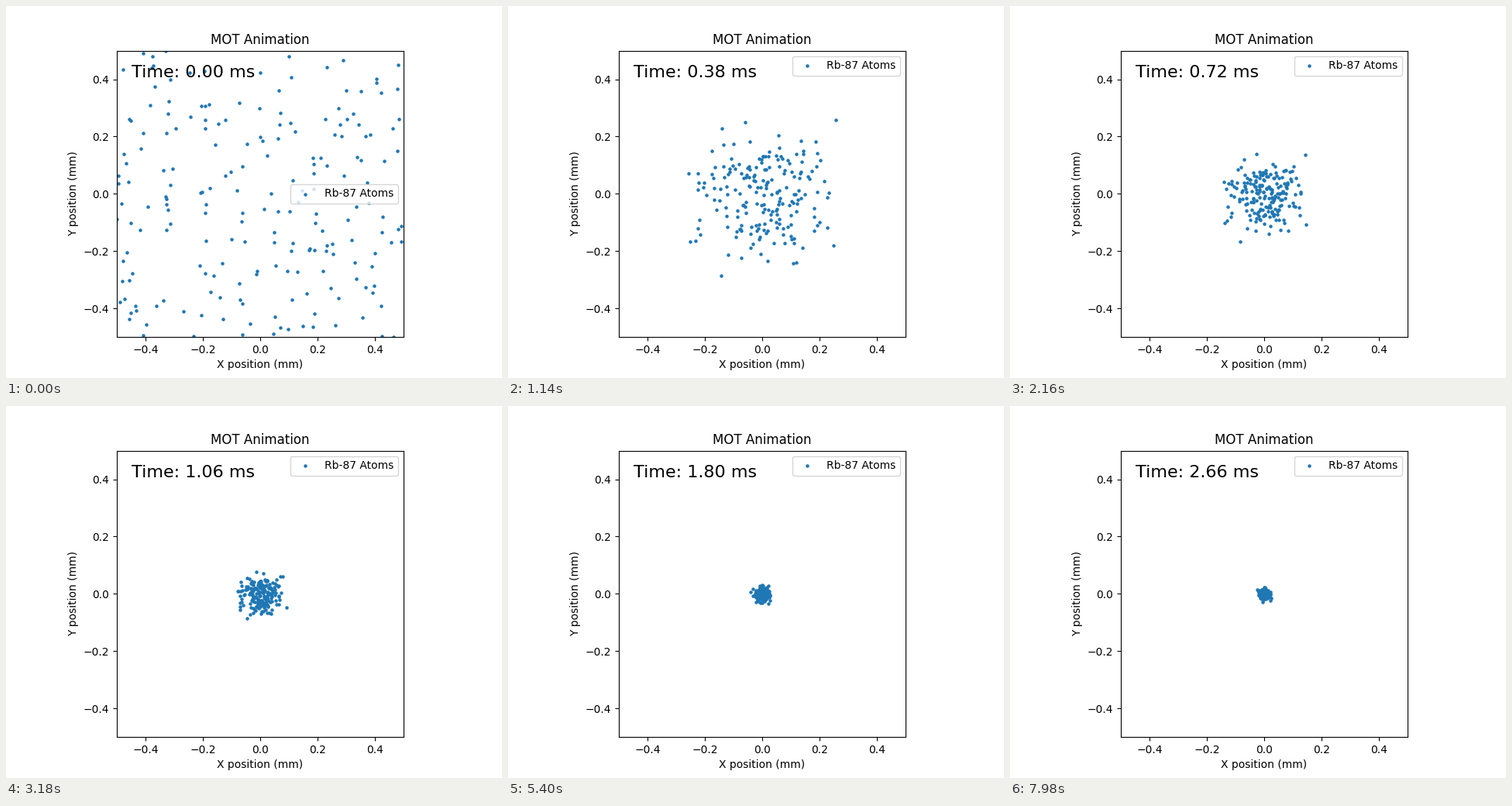
Recreate the animation shown at these times as a matplotlib script. Size 640 px wide and 480 px high, loop 8000 ms.

```python
import numpy as np
import matplotlib.pyplot as plt
from matplotlib.animation import FuncAnimation

TICK = 20          # ms per drawn frame
HOLD = 3           # drawn frames per simulation step
FRAMES = 400
STEPS = -(-FRAMES // HOLD)
DT = 0.02          # simulated ms per step
ATOMS = 200
LEGEND_MOVE = 5    # step at which the upper right corner is free
SLOW, FAST = 1.8, 8.0   # damping rates of the trap, per ms


def pull(t):
    """Share of the starting position left at time t."""
    return 0.58 * np.exp(-SLOW * t) + 0.42 * np.exp(-FAST * t)


def drift(t):
    """Reach of the thermal velocity at time t."""
    return np.exp(-SLOW * t) - np.exp(-FAST * t)


def simulate():
    rng = np.random.default_rng(87)
    start = rng.uniform(-0.5, 0.5, (ATOMS, 2))
    kick = rng.normal(0, 0.13, (ATOMS, 2))
    recoil = np.zeros((ATOMS, 2))
    path = np.empty((STEPS, ATOMS, 2))
    for k in range(STEPS):
        t = k * DT
        path[k] = pull(t) * start + drift(t) * kick + recoil
        recoil = 0.96 * recoil + rng.normal(0, 0.0025, (ATOMS, 2))
    return path


path = simulate()

fig, ax = plt.subplots(figsize=(6.4, 4.8), dpi=100)
ax.set_aspect("equal")
ax.set(xlim=(-0.5, 0.5), ylim=(-0.5, 0.5), title="MOT Animation",
       xlabel="X position (mm)", ylabel="Y position (mm)")
ticks = np.arange(-0.4, 0.5, 0.2)
ax.set_xticks(ticks)
ax.set_yticks(ticks)

dots = ax.scatter(*path[0].T, s=5, label="Rb-87 Atoms")
clock = ax.text(0.05, 0.95, "", transform=ax.transAxes, fontsize=16, va="top")
legend = ax.legend(loc="center right")


def update(i):
    step = i // HOLD
    dots.set_offsets(path[step])
    clock.set_text(f"Time: {step * DT:.2f} ms")
    legend.set_loc("center right" if step < LEGEND_MOVE else "upper right")
    return dots, clock, legend


anim = FuncAnimation(fig, update, frames=FRAMES, interval=TICK, repeat=True)
plt.show()
```
